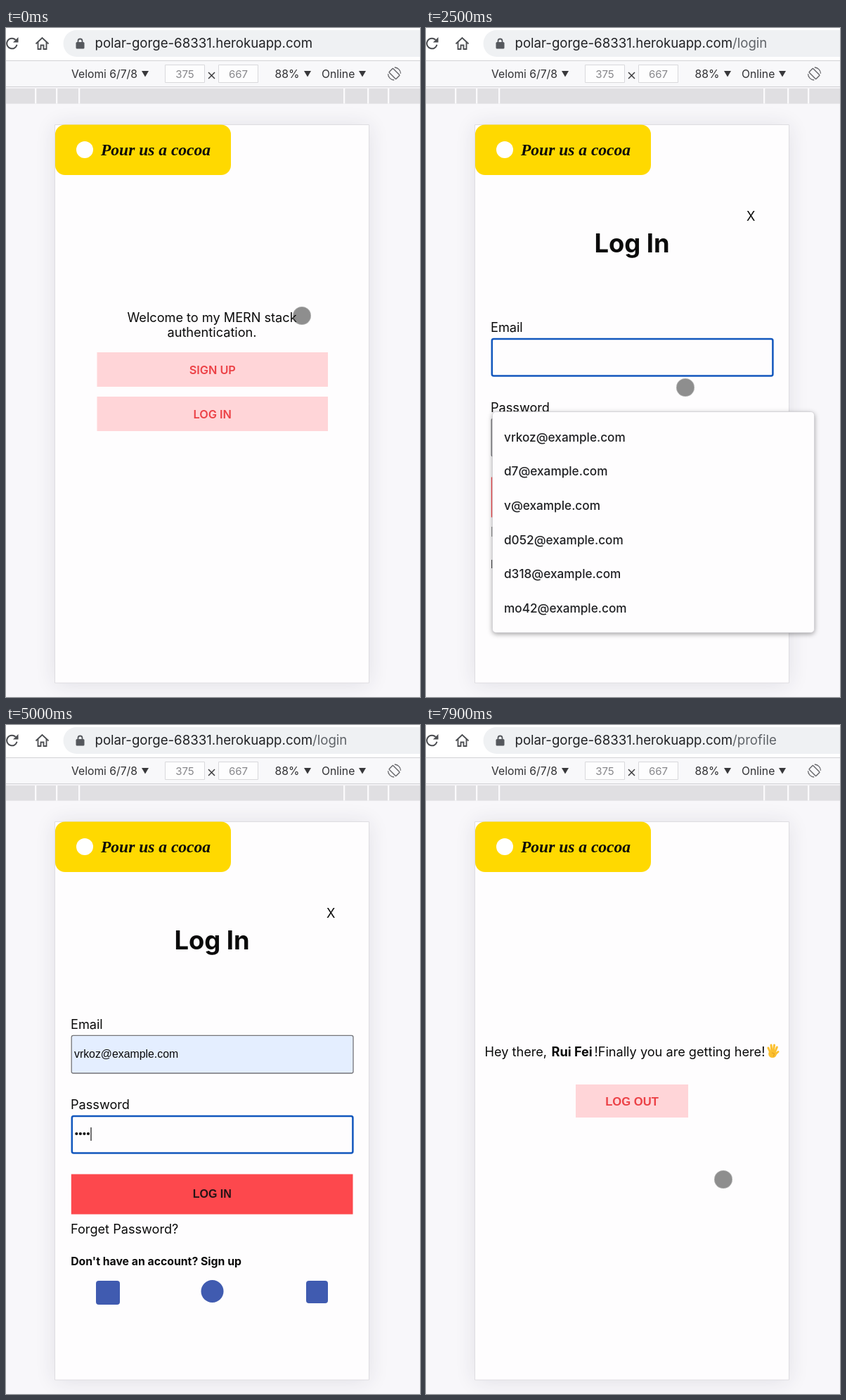
An HTML page with a canvas for the animation above (8000 ms loop, 589 by 951 pixels).

```html
<!DOCTYPE html>
<html lang="en">
<head>
<meta charset="utf-8">
<title>Login demo</title>
<style>
html, body { margin: 0; width: 100%; height: 100%; overflow: hidden; background: #f8f7fa; }
canvas { display: block; width: 589px; height: 951px; }
</style>
</head>
<body>
<canvas id="stage" width="589" height="951"></canvas>
<script>
const ctx = document.getElementById('stage').getContext('2d');
const LOOP = 8000, STEP = 100;
const UI = 'Inter, "Open Sans", sans-serif';
const ARIAL = '"Liberation Sans", Arial, sans-serif';
const BODY = 18.15;
const BLUE = '#1257bd', ICON = '#405bb0';
const EMAIL = 'vrkoz@example.com';
const SUGGESTIONS = [EMAIL, 'd7@example.com', 'v@example.com',
  'd052@example.com', 'd318@example.com', 'mo42@example.com'];

// Moments at which the state of the page changes
const AT = { login: 800, wait: 1100, waitEnd: 2000, focus: 1900, list: 2100, pick: 3000,
  pass: 3900, hide: 4300, show: 5800, press: 6900, release: 7100, wait2: 7100,
  profile: 7200, url: 7300, waitEnd2: 7400 };
const KEYS = [4300, 4500, 4700, 4900, 5200, 5500];
const CLICKS = [[500, 600], [1800, 1900], [2900, 3000], [3800, 3900], [AT.press, AT.release]];

// Pointer way points: time, x, y
const PATH = [[0, 421, 409], [100, 419, 413], [500, 381, 546], [1300, 380, 543],
  [1800, 371, 474], [2200, 371, 474], [2500, 369, 511], [2800, 364, 581],
  [5800, 364, 581], [6500, 440, 672], [7200, 440, 672], [7700, 423, 646], [8000, 423, 646]];

const between = (t, a, b) => t >= a && t < b;

function text(str, x, y, size, o = {}) {
  ctx.font = `${o.style || ''} ${o.weight || 400} ${size}px ${o.font || UI}`;
  ctx.fillStyle = o.color || '#0a0a0a';
  ctx.textAlign = o.align || 'left';
  ctx.fillText(str, x, y);
}

function box(x, y, w, h, fill, r = 0, stroke, width = 1) {
  ctx.beginPath();
  ctx.roundRect(x, y, w, h, r);
  if (fill) { ctx.fillStyle = fill; ctx.fill(); }
  if (stroke) { ctx.strokeStyle = stroke; ctx.lineWidth = width; ctx.stroke(); }
}

function disc(x, y, r, fill) {
  ctx.beginPath();
  ctx.arc(x, y, r, 0, Math.PI * 2);
  ctx.fillStyle = fill;
  ctx.fill();
}

function poly(points, fill) {
  ctx.beginPath();
  points.forEach(([x, y]) => ctx.lineTo(x, y));
  ctx.closePath();
  ctx.fillStyle = fill;
  ctx.fill();
}

function line(points, color, width) {
  ctx.beginPath();
  points.forEach(([x, y]) => ctx.lineTo(x, y));
  ctx.strokeStyle = color;
  ctx.lineWidth = width;
  ctx.stroke();
}

function shadowed(blur, dy, color, draw) {
  ctx.save();
  ctx.shadowBlur = blur;
  ctx.shadowOffsetY = dy;
  ctx.shadowColor = color;
  draw();
  ctx.restore();
}

function browserBar(path) {
  box(0, 0, 589, 46, '#ffffff');
  box(81.5, 3, 540, 38, '#eff1f3', 19);
  const ink = '#4b4d51';

  ctx.beginPath();
  ctx.arc(8.5, 22, 7.3, 0.25, 5.5);
  ctx.strokeStyle = ink;
  ctx.lineWidth = 2;
  ctx.stroke();
  poly([[17.5, 13], [17.5, 20.5], [10, 20.5]], ink);

  line([[42.5, 22.5], [51.5, 14], [60.5, 22.5]], ink, 1.8);
  line([[45.5, 20], [45.5, 30], [49.5, 30], [49.5, 24.5], [53.5, 24.5],
    [53.5, 30], [57.5, 30], [57.5, 20]], ink, 1.8);

  box(99.5, 20, 12, 9.5, '#55585d', 1.5);
  ctx.beginPath();
  ctx.arc(105.5, 18.5, 3, Math.PI, 0);
  ctx.lineTo(108.5, 21);
  ctx.moveTo(102.5, 18.5);
  ctx.lineTo(102.5, 21);
  ctx.strokeStyle = '#55585d';
  ctx.lineWidth = 1.8;
  ctx.stroke();

  text('polar-gorge-68331.herokuapp.com', 126.5, 28, 18.65, { color: '#202124' });
  text(path, 436, 28, 18.65, { color: '#5f6368' });
}

function deviceBar() {
  box(0, 46, 589, 38, '#f8f8fa');
  box(0, 46, 589, 1, '#d3d3d6');
  box(0, 83, 589, 1, '#d3d3d6');
  const dark = { color: '#303033' }, pale = { color: '#87878b', align: 'center' };
  text('Velomi 6/7/8', 93, 70.5, 15.7, dark);
  text('88%', 382.5, 70.5, 15.7, dark);
  text('Online', 449, 70.5, 15.7, dark);
  for (const x of [193, 424, 502]) poly([[x, 61], [x + 10, 61], [x + 5, 69.5]], '#38383b');
  box(226.5, 52.5, 56, 25, '#fdfdfe', 0, '#d9d9dc');
  box(302.5, 52.5, 56, 25, '#fdfdfe', 0, '#d9d9dc');
  text('375', 254.5, 70.5, 15, pale);
  text('667', 330.5, 70.5, 15, pale);
  line([[288, 63], [297, 72]], '#3a3a3d', 1.5);
  line([[297, 63], [288, 72]], '#3a3a3d', 1.5);

  ctx.save();
  ctx.translate(552.5, 65);
  ctx.rotate(-Math.PI / 4);
  box(-4, -7, 8, 14, null, 1, '#66666a', 1.4);
  ctx.lineWidth = 1.3;
  for (const a of [-0.75, Math.PI - 0.75]) {
    ctx.beginPath();
    ctx.arc(0, 0, 9, a, a + 1.5);
    ctx.stroke();
  }
  ctx.restore();

  box(0, 84, 589, 24, '#f3f2f5');
  box(0, 86, 589, 21.5, '#e0dfe2');
  for (const x of [41, 71, 103, 480, 514, 543]) box(x, 86, 2.3, 21.5, '#fbfafc');
}

function phone() {
  shadowed(28, 2, 'rgba(40,40,60,.11)', () => box(70, 137, 446, 794, '#fefdfe'));
  box(69.5, 137.5, 447, 793.5, '#fefdfe', 0, '#dedde1');
  box(70, 137.5, 250, 71.5, '#ffd900', 14);
  disc(112, 173, 12, '#ffffff');
  text('Pour us a cocoa', 135, 181, 23.5,
    { font: '"Liberation Serif", "Times New Roman", serif', style: 'italic', weight: 700 });
}

function pinkButton(x, y, w, h, label, o) {
  box(x, y, w, h, '#ffd5d8');
  text(label, x + w / 2, y + h / 2 + 6.2, o.size, { ...o, align: 'center', color: '#ec4146' });
}

function homePage() {
  const mid = { align: 'center' };
  text('Welcome to my MERN stack', 293, 417.5, BODY, mid);
  text('authentication.', 293, 438.5, BODY, mid);
  pinkButton(129.5, 461, 328.5, 49, 'SIGN UP', { size: 16.3, weight: 600 });
  pinkButton(129.5, 524, 328.5, 49, 'LOG IN', { size: 16.3, weight: 600 });
}

function field(y, focused, fill) {
  if (focused) box(93.8, y + 1, 399.6, 52.5, fill, 2.5, BLUE, 2.5);
  else box(93.2, y + 0.4, 400.8, 53.6, fill, 2.5, '#747478', 1.3);
}

function passwordDots(t, focused) {
  const n = KEYS.filter(k => t >= k).length;
  for (let i = 0; i < n; i++) disc(100.3 + i * 5.55, 581, 2.1, '#111');
  const typing = between(t, KEYS[0], KEYS[5] + 300);
  if (focused && (typing || t % 1000 < 500)) box(98.2 + n * 5.55, 572, 1.2, 19, '#111');
}

function suggestionList() {
  shadowed(7, 2, 'rgba(0,0,0,.38)', () => box(94.5, 545.5, 458, 314, '#fefdfe', 5));
  box(94.5, 545.5, 458, 314, null, 5, '#d0cfd3', 0.8);
  SUGGESTIONS.forEach((s, i) =>
    text(s, 111, 587.5 + i * 48.7, 17.2, { weight: 500, color: '#202124' }));
}

function loginPage(t) {
  const filled = t >= AT.pick;
  const inPass = between(t, AT.pass, AT.press);
  text('X', 456, 274, BODY);
  text('Log In', 293, 319, 36.3, { weight: 700, align: 'center' });
  text('Email', 92, 432.3, BODY);
  text('Password', 92, 546.3, BODY);
  field(441, between(t, AT.focus, AT.pass), filled ? '#e4eeff' : '#fefdfe');
  if (filled) text(EMAIL, 97, 473, 15.85, { font: ARIAL });
  field(555, inPass, '#fefdfe');
  passwordDots(t, inPass);

  box(92.8, 638.5, 400.7, 57, '#fd484d');
  if (t >= AT.press) box(93.2, 638.3, 400.2, 57, null, 3, BLUE, 2.4);
  text('LOG IN', 293.3, 671.7, 16, { font: ARIAL, weight: 700, align: 'center', color: '#241316' });
  text('Forget Password?', 92, 722.5, BODY);
  text("Don't have an account? Sign up", 92.2, 768, 15.8, { weight: 700 });
  box(128, 790, 34, 34, ICON, 4);
  disc(293.5, 805, 16, ICON);
  box(427, 790, 31, 32, ICON, 4);

  if (between(t, AT.list, AT.pick)) suggestionList();
}

function hand(x, y) {
  ctx.save();
  ctx.translate(x, y);
  ctx.lineCap = 'round';
  const skin = '#fbc02f';
  line([[-3, 3], [-6, -4]], skin, 3);
  line([[-1, 2], [-2, -8]], skin, 3);
  line([[1, 2], [2.5, -8]], skin, 3);
  line([[3, 3], [6.3, -5]], skin, 3);
  line([[2, 7], [8, 1.5]], skin, 3);
  ctx.beginPath();
  ctx.ellipse(0, 4.5, 5.8, 5.5, 0, 0, Math.PI * 2);
  ctx.fillStyle = skin;
  ctx.fill();
  line([[-1, 3], [2.5, 4], [1.5, 8]], '#e39a1d', 0.9);
  ctx.restore();
}

function profilePage() {
  text('Hey there,', 83.5, 471, BODY);
  text('Rui Fei', 178.5, 471, BODY, { weight: 700 });
  text('!Finally you are getting here!', 239.5, 471, BODY);
  hand(493, 463);
  pinkButton(213, 511, 160, 47, 'LOG OUT', { size: 16.6, weight: 700, font: ARIAL });
}

function statusBubble() {
  const corners = [0, 5, 0, 0];
  shadowed(12, 2, 'rgba(0,0,0,.45)', () => box(69.5, 902.5, 147.5, 28.5, '#d9dbe2', corners));
  box(69.5, 902.5, 147.5, 28.5, null, corners, '#a9aab1');
  text('Waiting for acc...', 77, 922.7, 15.8, { color: '#44454a' });
}

function pointer(t) {
  const i = Math.max(1, PATH.findIndex(p => p[0] > t));
  const [t0, x0, y0] = PATH[i - 1], [t1, x1, y1] = PATH[i];
  const u = (t - t0) / (t1 - t0), k = u * u * (3 - 2 * u);
  const x = x0 + (x1 - x0) * k, y = y0 + (y1 - y0) * k;
  const pressed = CLICKS.some(([a, b]) => between(t, a, b));
  disc(x, y, 13, 'rgba(0,0,0,.44)');
  ctx.beginPath();
  ctx.arc(x, y, pressed ? 14.2 : 12.8, 0, Math.PI * 2);
  ctx.strokeStyle = pressed ? 'rgba(255,255,255,.42)' : 'rgba(255,255,255,.3)';
  ctx.lineWidth = pressed ? 2.8 : 1;
  ctx.stroke();
}

function draw(t) {
  box(0, 0, 589, 951, '#f8f7fa');
  phone();
  if (t < AT.login) homePage();
  else if (t < AT.profile) loginPage(t);
  else profilePage();
  if (between(t, AT.wait, AT.waitEnd) || between(t, AT.wait2, AT.waitEnd2)) statusBubble();
  deviceBar();
  browserBar(t < AT.login ? '' : t < AT.url ? '/login' : '/profile');
  if (!between(t, AT.hide, AT.show)) pointer(t);
}

const start = performance.now();
function frame() {
  const t = (performance.now() - start) % LOOP;
  draw(Math.floor(t / STEP) * STEP);
  requestAnimationFrame(frame);
}
frame();
</script>
</body>
</html>
```
